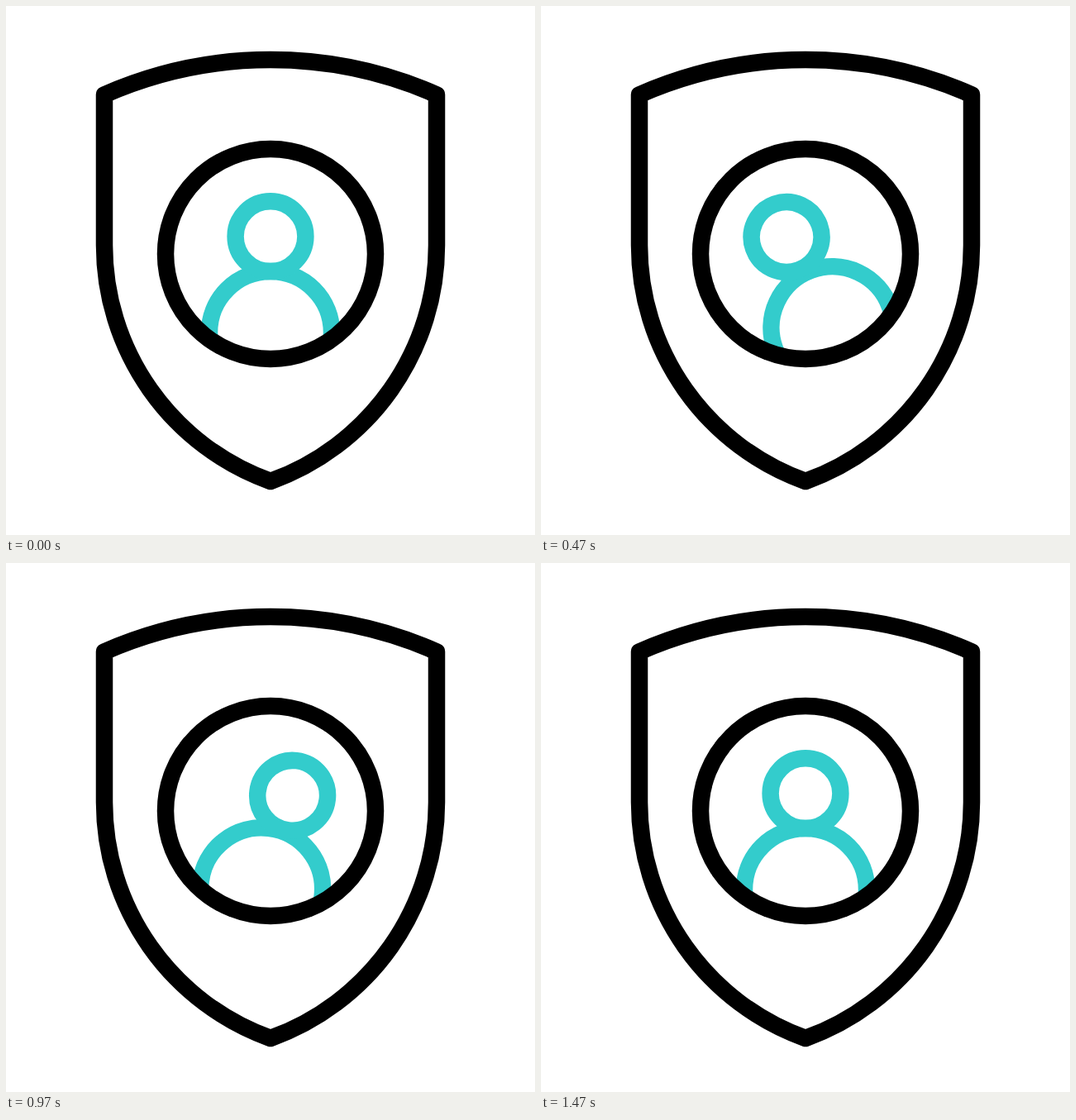
Recreate the animation shown at these times as an HTML page. Size 640 px wide and 640 px high, loop 1.67 s.

```html
<!DOCTYPE html>
<html lang="en">
<head>
<meta charset="utf-8">
<title>Shield with person</title>
<style>
  html, body { margin: 0; width: 100%; height: 100%; overflow: hidden; background: #fff; }
  svg { display: block; width: 100%; height: 100%; fill: none; stroke-width: 20.5; }
</style>
</head>
<body>
<svg viewBox="0 0 640 640">
  <clipPath id="window"><circle cx="320" cy="300" r="127"/></clipPath>
  <g clip-path="url(#window)" stroke="#33cccc">
    <g id="person">
      <circle cx="320" cy="395" r="74"/>
      <circle id="head" cx="320" cy="278.7" r="42.4"/>
    </g>
  </g>
  <g stroke="#000" stroke-linejoin="round">
    <circle cx="320" cy="300" r="127"/>
    <path d="M119 107.3A499 499 0 0 1 521 107.3V289.4A303.5 303.5 0 0 1 320 575A303.5 303.5 0 0 1 119 289.4Z"/>
  </g>
</svg>
<script>
  const LOOP = 1670, STEP = 100 / 3, LAST = 44;
  const person = document.getElementById("person");
  const head = document.getElementById("head");

  // Smooth rise from 0 to 1 between steps a and b
  function ramp(s, a, b) {
    const u = Math.min(1, Math.max(0, (s - a) / (b - a)));
    return u * u * (3 - 2 * u);
  }

  // The person swings about the ring's centre, each swing half the last
  const swing = s =>
    20 * ramp(s, 0, 11) - 30 * ramp(s, 15.5, 24) + 15 * ramp(s, 24.5, 39) - 5 * ramp(s, 39, LAST);

  // The head also slides sideways on the shoulders and lifts a little
  const slide = s => -34 * ramp(s, 0, 10) + 75 * ramp(s, 10, 22) - 41 * ramp(s, 22, 38);
  const lift = s => 6.3 * (ramp(s, 0, 10) - ramp(s, 10, 32));

  function draw(ms) {
    const tick = Math.floor((ms % LOOP) / 10) * 10;
    const s = Math.min(LAST, Math.floor((tick + 5) / STEP));
    person.setAttribute("transform", `rotate(${-swing(s)} 320 300)`);
    head.setAttribute("transform", `translate(${slide(s)} ${-lift(s)})`);
  }

  const start = performance.now();
  function loop() {
    draw(performance.now() - start);
    requestAnimationFrame(loop);
  }
  loop();
</script>
</body>
</html>
```
